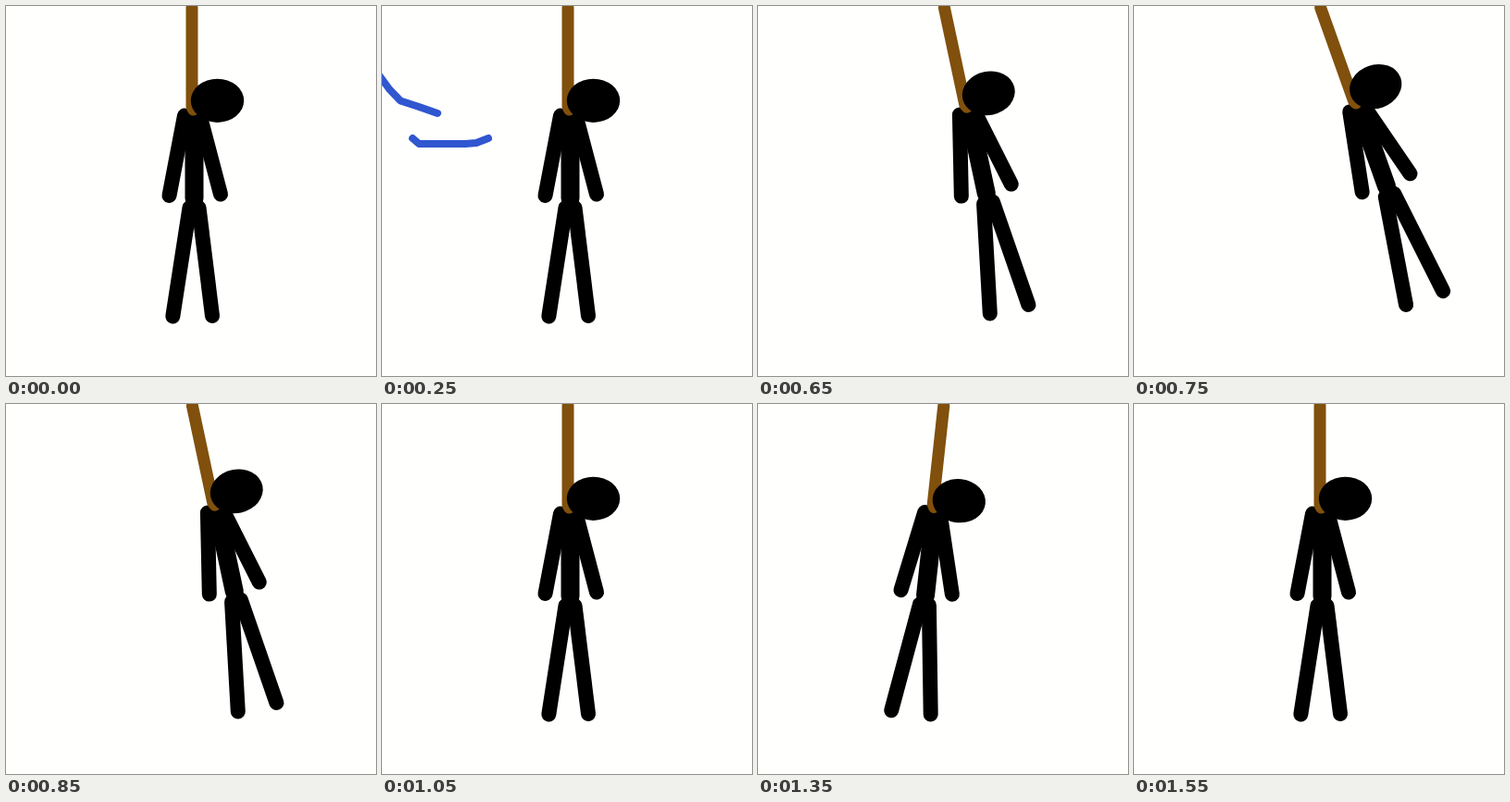
These frames come from a looping animation (400 px wide and 400 px high, 1.65 s). An HTML page with a canvas:

```html
<!DOCTYPE html>
<html lang="en">
<head>
<meta charset="utf-8">
<title>Swing in the wind</title>
<style>
html, body { margin: 0; width: 100%; height: 100%; overflow: hidden; background: #fffffd; }
canvas { display: block; width: 400px; height: 400px; }
</style>
</head>
<body>
<canvas id="stage" width="400" height="400"></canvas>
<script>
const ctx = document.getElementById('stage').getContext('2d');
const LOOP = 1650, SWING_START = 550, STEP = 100;
const PIVOT = 201;
const PAPER = '#fffffd', INK = '#000', ROPE = '#80500c', WIND = '#3056d0';

// Rises from 0 to size at peak, then falls back to 0 at end
function sway(t, start, peak, end, size, power) {
  const part = Math.min((t - start) / (peak - start), (end - t) / (end - peak));
  return size * Math.max(0, part) ** power;
}

// The pose is held for one step at a time
function angleAt(t) {
  if (t < SWING_START) return 0;
  const held = SWING_START + Math.floor((t - SWING_START) / STEP) * STEP;
  return sway(held, 450, 750, 1050, 19.6, 1.2) - sway(held, 1050, 1350, 1550, 6.2, 0.75);
}

function line(width, color, ...points) {
  ctx.beginPath();
  for (const [x, y] of points) ctx.lineTo(x, y);
  ctx.lineWidth = width;
  ctx.strokeStyle = color;
  ctx.stroke();
}

function drawFigure(degrees) {
  const limb = (from, to, width = 16) => line(width, INK, from, to);
  ctx.save();
  ctx.translate(PIVOT, 0);
  ctx.rotate(-degrees * Math.PI / 180);
  ctx.translate(-PIVOT, 0);

  limb([193, 118.5], [176.5, 205]);
  limb([209.5, 118], [232, 203.5]);
  limb([203.5, 121], [203.5, 208], 20);
  limb([198.5, 218], [180.3, 335.5]);
  limb([208.5, 218], [223, 335]);

  line(13, ROPE, [201, 2], [201, 109], [202.5, 112]);

  ctx.beginPath();
  ctx.ellipse(228.5, 102.3, 28.7, 23.6, 0, 0, Math.PI * 2);
  ctx.fillStyle = INK;
  ctx.fill();
  ctx.restore();
}

function drawWind(t) {
  const gust = (...points) => line(8, WIND, ...points);
  if (t >= 100) gust([-3, 75], [8, 90], [20, 102.5], [40, 109], [60, 116]);
  if (t >= 250) gust([33, 143], [40, 149], [90, 149], [102, 148], [115, 143]);
  if (t >= 400) gust([70, 186], [122, 175], [169, 146]);
}

function draw(t) {
  ctx.fillStyle = PAPER;
  ctx.fillRect(0, 0, 400, 400);
  ctx.lineCap = ctx.lineJoin = 'round';
  drawFigure(angleAt(t));
  if (t < SWING_START) drawWind(t);
}

const start = performance.now();
function tick() {
  draw((performance.now() - start) % LOOP);
  requestAnimationFrame(tick);
}
tick();
</script>
</body>
</html>
```
